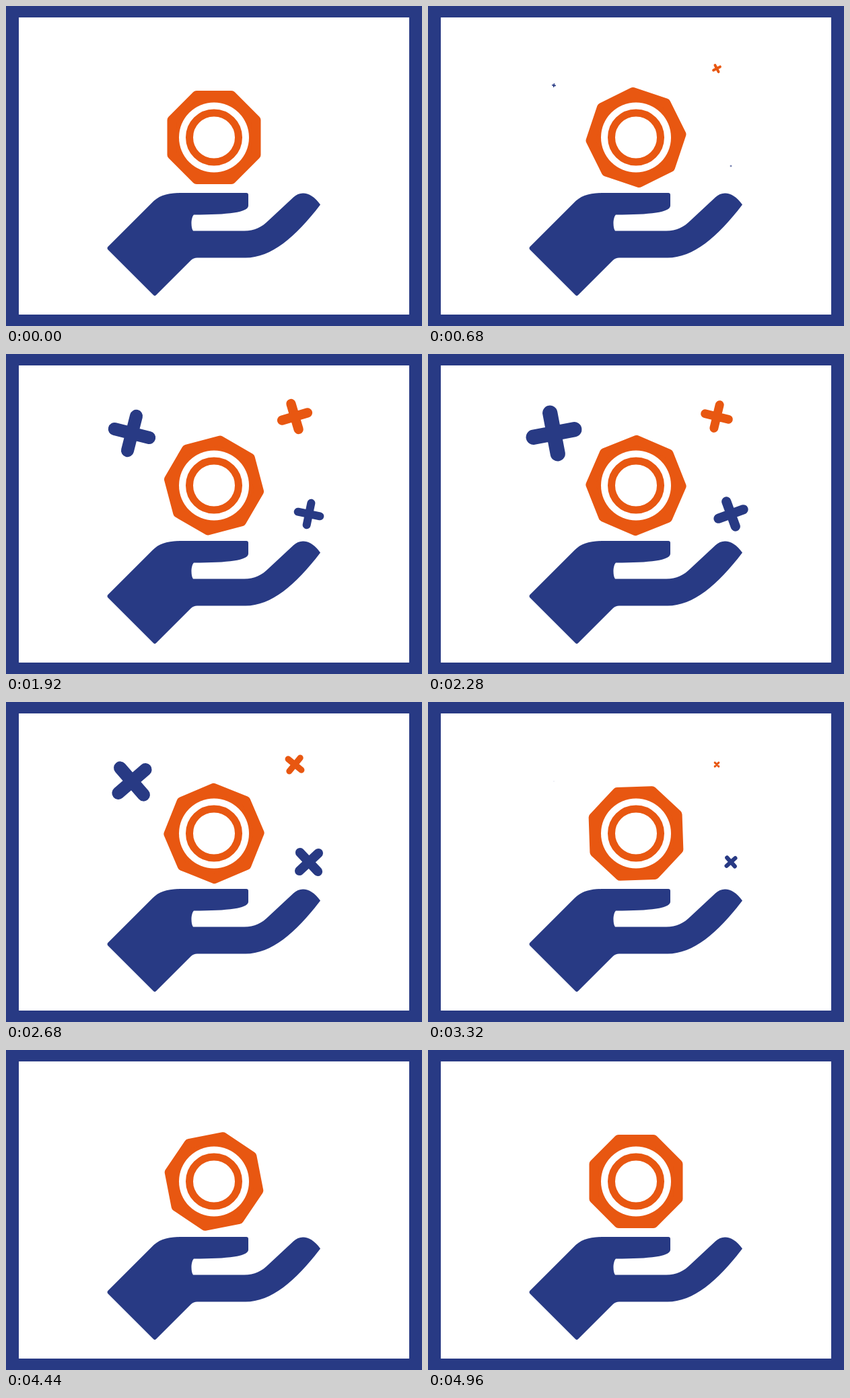
Recreate the animation shown at these times as an HTML page. Size 618 px wide and 476 px high, loop 5 s.

```html
<!DOCTYPE html>
<html lang="en">
<head>
<meta charset="utf-8">
<title>Hand and nut</title>
<style>
  html, body { margin: 0; width: 100%; height: 100%; overflow: hidden; background: #fff; }
  svg { display: block; width: 618px; height: 476px; --blue: #283a84; --orange: #e85711; }
  .blue { fill: var(--blue); stroke: var(--blue); }
  .orange { fill: var(--orange); stroke: var(--orange); }

  .nut, .cross {
    transform-origin: 0 0;
    animation: 5s infinite both;
    animation-timing-function: cubic-bezier(.333, 0, .667, 1);
  }
  .nut { animation-name: turn; stroke-width: 14; stroke-linejoin: round; }
  .cross { fill: none; stroke-width: 53; stroke-linecap: round; }
  .big { animation-name: big-turn, big-pop; }
  .top { animation-name: top-turn, top-pop; }
  .low { animation-name: low-turn, low-pop; }

  @keyframes turn { 0% { rotate: 0deg } 99.2%, 100% { rotate: 360deg } }

  @keyframes big-turn { 0%, 8.1% { rotate: 0deg } 65.7%, 100% { rotate: 360deg } }
  @keyframes big-pop { 0%, 6.7% { scale: 0 } 49.1% { scale: .428 } 67.2%, 100% { scale: 0 } }

  @keyframes top-turn { 0%, 1.5% { rotate: 0deg } 82.2%, 100% { rotate: -450deg } }
  @keyframes top-pop {
    0% { scale: 0 }
    39.2% { scale: .27; animation-timing-function: cubic-bezier(.25, 0, .667, 1) }
    78.4%, 100% { scale: 0 }
  }

  @keyframes low-turn { 0%, 16% { rotate: 0deg } 80%, 100% { rotate: 360deg } }
  @keyframes low-pop { 0%, 7.8% { scale: 0 } 49.6% { scale: .275 } 80.2%, 100% { scale: 0 } }
</style>
</head>
<body>
<svg viewBox="0 0 618 476">
  <defs><path id="plus" d="M-73.5 0H73.5M0-73.5V73.5"/></defs>

  <path fill="#283a84" fill-rule="evenodd" d="M0 0H618V476H0ZM19 17V459H599V17Z"/>

  <path class="blue" stroke="none" style="stroke: none" d="M152 357.500L216 293.500C227 282 239 278 262 278H357
    Q360 278 360 281V297C360 307 330 310.500 279 310.500C274.500 315 274.500 330 278 334.500
    H354C369 334.500 380 329 390 319L427 284.500C438 274 454 277 467 295.500
    C430 344 394 374.500 356 374.500H284Q278.500 374.500 275 378L223 430Q221 432 219 430L152 363Q149 360 152 357.500Z"/>

  <g transform="translate(309 195.500)">
    <polygon class="nut orange" points="-25.900,-62.500 25.900,-62.500 62.500,-25.900 62.500,25.900 25.900,62.500 -25.900,62.500 -62.500,25.900 -62.500,-25.900"/>
    <circle r="52" fill="#fff"/>
    <circle r="36.500" fill="none" stroke="#e85711" stroke-width="11"/>
  </g>

  <g transform="translate(187 118)"><use href="#plus" class="cross big" stroke="#283a84"/></g>
  <g transform="translate(429 93)"><use href="#plus" class="cross top" stroke="#e85711"/></g>
  <g transform="translate(450 238)"><use href="#plus" class="cross low" stroke="#283a84"/></g>
</svg>
</body>
</html>
```
